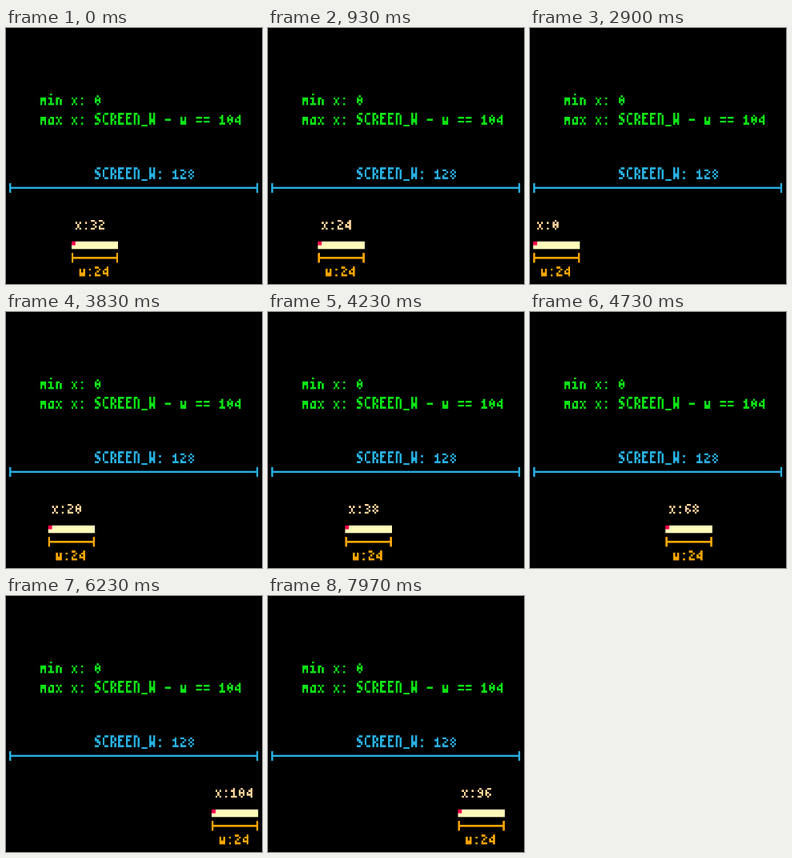
Recreate the animation shown at these times as an HTML page with a canvas. Size 320 by 320 pixels, loop 8 s.

```html
<!DOCTYPE html>
<html lang="en">
<head>
<meta charset="utf-8">
<title>Clamped x</title>
<style>
html, body { margin: 0; width: 100%; height: 100%; overflow: hidden; background: #000; }
canvas { display: block; width: 320px; height: 320px; }
</style>
</head>
<body>
<canvas id="stage" width="320" height="320"></canvas>
<script>
const LOOP = 8000, STEP = 1000 / 30;
const ORIGIN = 4, SCALE = 2.432, UNITS = 130, SHARP = 4;
const GREEN = '#0ce414', BLUE = '#27b0e2', PEACH = '#ffd29a',
      CREAM = '#fff9ba', ORANGE = '#ffa600', RED = '#ff004d';

const stage = document.getElementById('stage').getContext('2d');
// Whole-unit drawing happens here, then is scaled softly onto the stage.
const grid = document.createElement('canvas');
grid.width = grid.height = UNITS * SHARP;
const ctx = grid.getContext('2d');
ctx.scale(SHARP, SHARP);

// Pixel font, three columns wide; rows are aligned to the bottom of a six-row cell.
const GLYPHS = {
  S: '011 100 110 011 001 110', C: '011 100 100 100 100 011',
  R: '110 101 101 110 101 101', E: '111 100 110 100 100 111',
  N: '110 101 101 101 101 101', W: '101 101 101 111 111 101',
  m: '111 111 101 101', i: '010 000 110 010 010 111',
  n: '110 101 101 101', a: '011 101 101 111',
  x: '101 010 010 101', w: '101 101 111 111',
  0: '010 101 111 101 010', 1: '010 110 010 010 111',
  2: '110 001 010 100 111', 3: '110 001 010 001 110',
  4: '001 011 101 111 001', 5: '111 100 110 001 110',
  6: '011 100 110 101 010', 7: '111 001 010 010 010',
  8: '010 101 010 101 010', 9: '010 101 011 001 110',
  ':': '010 000 000 010', '_': '111',
  '-': '111 000 000', '=': '111 000 111 000'
};

// [step, x]: straight runs between holds
const PATH = [[0, 32], [24, 32], [28, 24], [31, 24], [43, 0], [102, 0],
              [112, 20], [118, 20], [127, 38], [160, 104], [235, 104], [239, 96], [240, 96]];

function box(x, y, w, h, color) {
  ctx.fillStyle = color;
  ctx.fillRect(x, y, w, h);
}

function print(text, x, y, color) {
  [...text].forEach((char, i) => {
    if (char === ' ') return;
    const rows = GLYPHS[char].split(' ');
    const top = y + (char === '_' ? 7 : 6) - rows.length;  // underscore sits below the baseline
    rows.forEach((row, r) => [...row].forEach((bit, c) => {
      if (bit === '1') box(x + i * 4 + c, top + r, 1, 1, color);
    }));
  });
}

function measure(x, y, w, color) {
  box(x, y, w, 1, color);
  box(x, y - 2, 1, 5, color);
  box(x + w - 1, y - 2, 1, 5, color);
}

function xAt(step) {
  const i = PATH.findIndex(([s]) => s > step);
  if (i < 0) return PATH[PATH.length - 1][1];
  const [s0, x0] = PATH[i - 1], [s1, x1] = PATH[i];
  return Math.round(x0 + (x1 - x0) * (step - s0) / (s1 - s0));
}

function draw(time) {
  const x = xAt(Math.floor((time % LOOP + 5) / STEP));
  box(0, 0, UNITS, UNITS, '#000');

  print('min x: 0', 16, 32, GREEN);
  print('max x: SCREEN_W - w == 104', 16, 42, GREEN);
  print('SCREEN_W: 128', 44, 70, BLUE);
  measure(0, 80, 128, BLUE);

  print('x:' + x, x + 2, 96, PEACH);
  box(x, 108, 24, 4, CREAM);
  box(x, 108, 2, 2, RED);
  measure(x, 116, 24, ORANGE);
  print('w:24', x + 4, 120, ORANGE);

  stage.fillStyle = '#000';
  stage.fillRect(0, 0, 320, 320);
  stage.drawImage(grid, ORIGIN, ORIGIN, UNITS * SCALE, UNITS * SCALE);
}

const start = performance.now();
function tick() {
  draw(performance.now() - start);
  requestAnimationFrame(tick);
}
tick();
</script>
</body>
</html>
```
